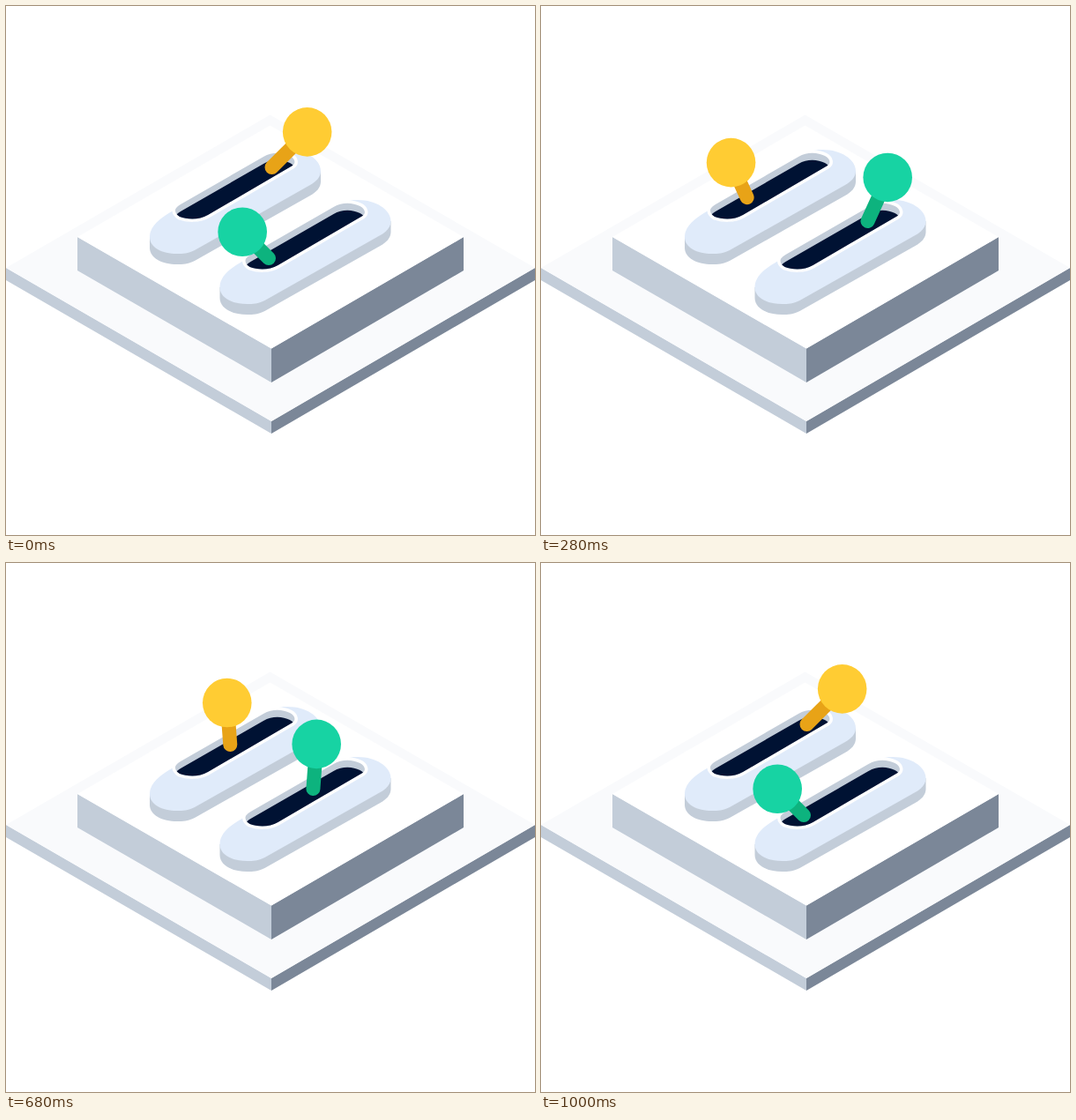
An HTML page that plays this animation: 600 px wide and 600 px high, repeating every 1.6 s.

```html
<!DOCTYPE html>
<html lang="en">
<head>
<meta charset="utf-8">
<title>Two levers</title>
<style>
  html, body { margin: 0; height: 100%; overflow: hidden; background: #fff; }
  svg { display: block; width: 100vw; height: 100vh; }
  .light { fill: #f9fafc; }
  .left { fill: #c3cdd9; }
  .right { fill: #7b8798; }
  .stick { stroke-width: 16; stroke-linecap: round; }
</style>
</head>
<body>
<svg viewBox="0 0 600 600">
  <defs>
    <path id="hole" d="M192 232C192 229 195 227 198 225L292 171C302 165 314 166 322 170C328 173 329 178 325 181L229 237C219 243 205 242 197 239C194 237 192 235 192 232Z"/>
    <clipPath id="inside"><use href="#hole"/></clipPath>
    <g id="slot">
      <path class="left" d="M163 262V274C163 286 177 293 194 293C201 293 206 293 214 289L345 215C352 211 357 206 357 199V187Z"/>
      <path fill="#e0ebfa" d="M163 262C163 248 178 239 188 233L300 168C308 163 314 163 320 163C340 163 357 174 357 187C357 194 352 199 345 203L214 277C206 281 201 281 194 281C177 281 163 274 163 262Z"/>
      <use href="#hole" fill="#c3cdd9" stroke="#fff" stroke-width="7"/>
      <use href="#hole" class="left"/>
      <g clip-path="url(#inside)"><use href="#hole" y="8" fill="#001233"/></g>
    </g>
  </defs>

  <path class="left" d="M0 297L301 471V485L0 311Z"/>
  <path class="right" d="M600 297L301 471V485L600 311Z"/>
  <path class="light" d="M0 297L299.5 123.5L600 297L301 471Z"/>
  <path class="left" d="M81 262L301 388.5V427L81 300Z"/>
  <path class="right" d="M519 262L301 388.5V427L519 300Z"/>
  <path fill="#fff" d="M81 262L299.5 135.5L519 262L301 388.5Z"/>

  <use href="#slot"/>
  <use href="#slot" x="79.5" y="57"/>

  <g id="yellow">
    <line class="stick" stroke="#e8a317"/>
    <circle r="27.8" fill="#ffcc33"/>
  </g>
  <g id="green">
    <line class="stick" stroke="#0db37e"/>
    <circle r="27.8" fill="#17d3a3"/>
  </g>
</svg>
<script>
const LOOP = 1600, STEP = 40, TURN = 400, END = 1000;

// [left, right] values of the foot position and the visible stick length
const levers = {
  yellow: { x: [216, 301.5], y: [227.2, 183], len: [40, 56.8] },
  green: { x: [298, 389.3], y: [286.1, 234.4], len: [42.2, 57.8] }
};

const mix = ([a, b], q) => a + (b - a) * q;
const ease = p => (1 - Math.cos(Math.PI * p)) / 2;

function setAttrs(el, attrs) {
  for (const name in attrs) el.setAttribute(name, attrs[name]);
}

// q runs from 0 (left end of the slot) to 1 (right end)
function pose(id, q) {
  const { x, y, len } = levers[id];
  const [stick, ball] = document.getElementById(id).children;
  const footX = mix(x, q);
  const footY = mix(y, q) - 6 * q * (1 - q);
  const sin = Math.SQRT2 * (q - 0.5);
  const cos = Math.sqrt(1 - sin * sin);
  const size = mix(len, q);
  const topX = footX + size * sin;
  const topY = footY - size * cos;
  setAttrs(stick, { x1: footX, y1: footY, x2: topX, y2: topY });
  setAttrs(ball, { cx: topX, cy: topY });
}

function draw() {
  // The motion advances at 25 steps per second
  const t = Math.floor(performance.now() % LOOP / STEP) * STEP;
  const q = t < TURN
    ? ease(t / TURN)
    : 1 - ease(Math.min(1, (t - TURN) / (END - TURN)));
  pose('yellow', 1 - q);
  pose('green', q);
  requestAnimationFrame(draw);
}
draw();
</script>
</body>
</html>
```
